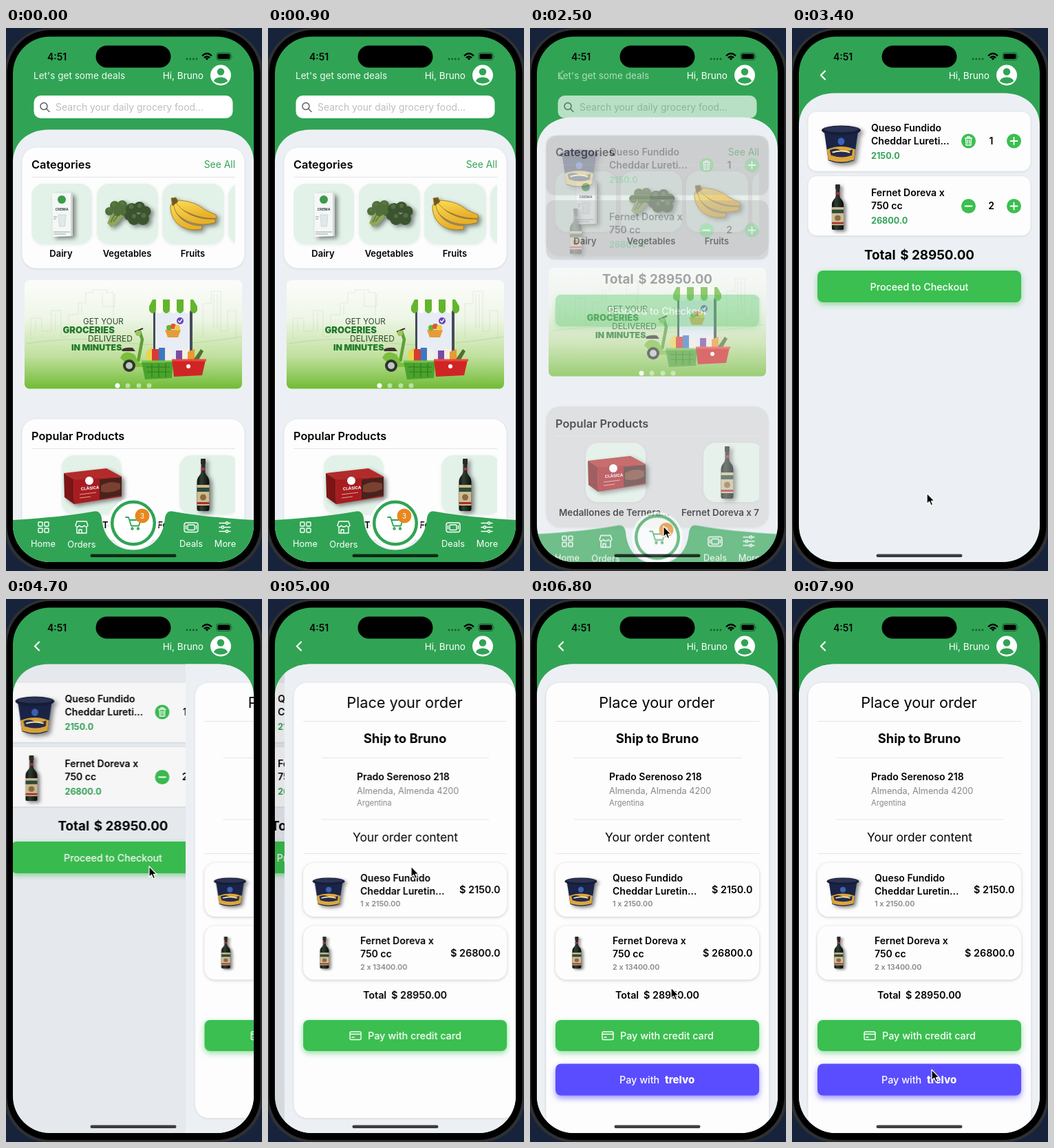
An HTML page that plays this animation: 372x788 px, repeating every 8000 ms.

```html
<!DOCTYPE html>
<html lang="en">
<head>
<meta charset="utf-8">
<title>Grocery checkout</title>
<style>
html, body { margin: 0; width: 100%; height: 100%; overflow: hidden; background: #16233a; }
svg { display: block; width: 372px; height: 788px; font-family: Inter, Roboto, sans-serif; font-size: 14px; }
.mid { text-anchor: middle; }
.end { text-anchor: end; }
.b { font-weight: 600; }
.bb { font-weight: 700; }
.white { fill: #fff; }
.grey { fill: #85878a; }
.green { fill: #34a457; }
.line { stroke: #e3e5e7; }
.tile { fill: #e3f2e9; filter: drop-shadow(0 1px 2px #0001); }
.card { fill: #fdfdfe; stroke: #dfe2e5; stroke-width: .8; filter: drop-shadow(0 1px 1px #0001); }
.item { fill: #fdfdfe; filter: drop-shadow(0 1px 2px #0003); }
.btn { fill: #3bbf50; filter: drop-shadow(0 3px 4px #3bbf5088); }
.pay { fill: #5a4dff; filter: drop-shadow(0 4px 4px #5a4dff99); }
.cast { filter: drop-shadow(4px 3px 3px #0007); }
.icon { fill: none; stroke: #fff; stroke-width: 1.4; stroke-linecap: round; stroke-linejoin: round; }
.name { font-weight: 600; font-size: 14px; }

.lift, .sink, .out, .in, .shadeOut, .shadeIn, .back, .push, .dim, .late, .cursor {
  animation: 8s linear infinite;
}
.lift { animation-name: lift; }
.sink { animation-name: sink; }
.out { animation-name: out; }
.in { animation-name: in; }
.shadeOut { animation-name: shadeOut; }
.shadeIn { animation-name: shadeIn; }
.back { animation-name: back; }
.push { animation-name: push; }
.dim { animation-name: dim; }
.late { animation-name: late; }
.cursor { animation-name: cursor; }

@keyframes lift {
  0%, 29.45% { transform: translateY(0); animation-timing-function: cubic-bezier(.4,0,.2,1); }
  35.7%, 100% { transform: translateY(-53px); }
}
@keyframes sink {
  0%, 29.45% { transform: translateY(0); opacity: 1; animation-timing-function: cubic-bezier(.4,0,.2,1); }
  35.7%, 100% { transform: translateY(60px); opacity: 0; }
}
@keyframes out {
  0%, 29.45% { opacity: 1; animation-timing-function: cubic-bezier(.4,0,.2,1); }
  35.7%, 100% { opacity: 0; }
}
@keyframes in {
  0%, 29.45% { opacity: 0; animation-timing-function: cubic-bezier(.4,0,.2,1); }
  35.7%, 100% { opacity: 1; }
}
@keyframes shadeOut {
  0%, 29.45% { fill: #fdfdfe; }
  31.25%, 100% { fill: #d8d8d8; }
}
@keyframes shadeIn {
  0%, 31.25% { fill: #a8a8a8; }
  35.7%, 100% { fill: #fdfdfe; }
}
@keyframes back {
  0%, 58% { transform: translateX(0); animation-timing-function: cubic-bezier(.15,.25,.25,1); }
  64.25%, 100% { transform: translateX(-105px); }
}
@keyframes push {
  0%, 58% { transform: translateX(350px); animation-timing-function: cubic-bezier(.15,.25,.25,1); }
  64.25%, 100% { transform: translateX(0); }
}
@keyframes dim {
  0%, 58% { opacity: 0; animation-timing-function: cubic-bezier(.15,.25,.25,1); }
  64.25%, 100% { opacity: .1; }
}
@keyframes late {
  0%, 79.99% { visibility: hidden; }
  80%, 100% { visibility: visible; }
}
@keyframes cursor {
  0%, 11.25% { transform: translate(232px, 800px); animation-timing-function: ease-in-out; }
  18.75%, 39.4% { transform: translate(194px, 723px); animation-timing-function: ease-in-out; }
  51.25%, 77.5% { transform: translate(208px, 388px); animation-timing-function: ease-in-out; }
  91%, 100% { transform: translate(203px, 683px); }
}
</style>
</head>
<body>
<svg viewBox="0 0 372 788">
<defs>
  <clipPath id="screen"><rect x="10" y="12.5" width="350" height="762.5" rx="54"/></clipPath>
  <clipPath id="sheet"><path id="sheetShape" d="M10 195C10 167 31 147.500 62 147.500H308C339 147.500 360 167 360 195V900H10Z"/></clipPath>
  <clipPath id="list"><rect x="37" y="218" width="296" height="540"/></clipPath>
  <clipPath id="ad"><rect x="27" y="366" width="316" height="157.5" rx="7"/></clipPath>
  <linearGradient id="meadow" x2="0" y2="1">
    <stop offset="0" stop-color="#fcfdfb"/><stop offset=".35" stop-color="#eef6e7"/>
    <stop offset=".7" stop-color="#c0e09d"/><stop offset="1" stop-color="#70bb34"/>
  </linearGradient>
  <linearGradient id="glass">
    <stop offset="0" stop-color="#0c0f0c"/><stop offset=".35" stop-color="#303e32"/><stop offset="1" stop-color="#0a0c0a"/>
  </linearGradient>
  <linearGradient id="peel" x2=".3" y2="1">
    <stop offset="0" stop-color="#fbdc58"/><stop offset="1" stop-color="#e8b02a"/>
  </linearGradient>
  <pattern id="stripes" width="20" height="60" x="208" patternUnits="userSpaceOnUse">
    <rect width="10" height="60" fill="#64b52e"/><rect x="10" width="10" height="60" fill="#fffdf2"/>
  </pattern>

  <!-- 22 x 76 -->
  <g id="bottle" class="cast">
    <path d="M8 1H14V18C14 25 20 25 20 34V73Q20 76 17 76H5Q2 76 2 73V34C2 25 8 25 8 18Z" fill="url(#glass)"/>
    <rect x="7.500" width="7" height="8" rx="1" fill="#2b2a25"/>
    <path d="M8 13h6v4h-6z" fill="#a5343a"/>
    <path d="M2 38H20V68H2Z" fill="#cdbc90"/>
    <path d="M2 42H20V48H2Z" fill="#2d4a3c"/>
    <circle cx="11" cy="56" r="4.500" fill="#8c6a44"/>
    <path d="M2 63H20V66H2Z" fill="#a8312f"/>
  </g>

  <!-- 58 x 52 -->
  <g id="tub" class="cast">
    <path d="M4 9H54L48 48Q29 55 10 48Z" fill="#1a2447"/>
    <path d="M8 33Q29 25 50 33L48 47Q29 53 10 47Z" fill="#dda63a"/>
    <path d="M12 34q8-4 16 0t18-1l-1 8q-15 5-31 0z" fill="#262c4c"/>
    <path d="M16 37q13-4 26 0" stroke="#f7e6b0" stroke-width="2" fill="none"/>
    <ellipse cx="29" cy="7" rx="29" ry="6.500" fill="#171d36"/>
    <ellipse cx="29" cy="5.500" rx="26" ry="4" fill="#2a3354"/>
    <circle cx="29" cy="22" r="5" fill="#3d62b5"/>
  </g>

  <g id="trash" fill="none" stroke="#fff" stroke-width="1.300" stroke-linecap="round">
    <path d="M-5-4H5M-2-4V-6H2V-4M-4-4L-3.400 6H3.400L4-4M-1.400-1.500V3.500M1.400-1.500V3.500"/>
  </g>
  <g id="plus"><circle r="10.500" fill="#3bbf50"/><path d="M-5 0H5M0-5V5" stroke="#fff" stroke-width="1.800" stroke-linecap="round"/></g>
</defs>

<!-- phone body -->
<rect width="372" height="788" fill="#16233a"/>
<rect x="-3" y="0" width="377" height="789" rx="67" fill="#2f3033"/>
<rect x="1.500" y="3" width="368" height="782" rx="63" fill="#000"/>

<g clip-path="url(#screen)">
  <rect x="10" y="12" width="350" height="764" fill="#30a454"/>

  <g class="out">
    <text x="40" y="74" font-size="13.600" class="white" opacity=".93">Let's get some deals</text>
    <rect x="40.500" y="98" width="289" height="33" rx="10" fill="#fff"/>
    <g fill="none" stroke="#55585c" stroke-width="1.400" stroke-linecap="round"><circle cx="55" cy="113.500" r="5"/><path d="M59 117.500L63 121.500"/></g>
    <text x="72" y="120" font-size="13.900" fill="#bbbec2">Search your daily grocery food...</text>
  </g>
  <path class="in" d="M48 62.500L42 68.500L48 74.500" fill="none" stroke="#fff" stroke-width="2.200" stroke-linecap="round" stroke-linejoin="round"/>
  <text x="287" y="74" font-size="13.600" class="white end">Hi, Bruno</text>
  <circle cx="312" cy="68.500" r="15" fill="#fff"/>
  <circle cx="312" cy="63.500" r="5.200" fill="#30a454"/>
  <path d="M302 77.500C303 69.500 321 69.500 322 77.500Q312 84 302 77.500Z" fill="#30a454"/>

  <g class="lift">
    <use href="#sheetShape" fill="#ecf0f4"/>
    <g clip-path="url(#sheet)">

      <!-- home -->
      <g class="out">
        <rect class="card shadeOut" x="23" y="173" width="324" height="176" rx="21"/>
        <text x="37" y="204" font-size="16.350" class="b">Categories</text>
        <text x="333" y="203" font-size="13.900" class="green end">See All</text>
        <path class="line" d="M37 216.500H333"/>
        <g clip-path="url(#list)">
          <rect class="tile" x="37" y="226" width="88" height="88" rx="18"/>
          <rect class="tile" x="132" y="226" width="89" height="88" rx="18"/>
          <rect class="tile" x="227" y="226" width="90" height="88" rx="18"/>
          <rect class="tile" x="323" y="226" width="90" height="88" rx="18"/>
        </g>
        <g class="cast">
          <path d="M67 240L94 239L97 243V302L68 303Z" fill="#f5f7f6"/>
          <path d="M94 239L97 243V302L94 302Z" fill="#cfd6d3"/>
          <circle cx="81" cy="249" r="6" fill="#3c9a4c"/>
          <text x="81" y="265" font-size="5.200" class="mid bb" fill="#35434a">CREMA</text>
          <path d="M76 271h11l-1.500 17h-8z" fill="#e0e9e9" stroke="#b9c9c8" stroke-width=".6"/>
          <path d="M69 274h5M69 277h4M69 296h24M69 299h18" stroke="#8fa3a0" stroke-width="1.200"/>
        </g>
        <g class="cast">
          <path d="M152 272L147 283L153 289L162 283L172 271L162 264Z" fill="#8fa85a"/>
          <path d="M156 281L166 268M152 282L160 267" stroke="#657f44" stroke-width="2"/>
          <g fill="#4f6e3a">
            <circle cx="150" cy="266" r="6"/><circle cx="158" cy="258" r="7"/><circle cx="169" cy="257" r="7"/><circle cx="172" cy="267" r="6"/><circle cx="162" cy="267" r="6"/>
          </g>
          <g fill="#3c5330">
            <circle cx="183" cy="263" r="9"/><circle cx="194" cy="260" r="8"/><circle cx="203" cy="266" r="7.500"/><circle cx="199" cy="277" r="9"/><circle cx="186" cy="277" r="9"/><circle cx="178" cy="273" r="6"/>
          </g>
          <g fill="#5d7a48" opacity=".7">
            <circle cx="156" cy="256" r="3"/><circle cx="169" cy="254" r="3"/><circle cx="182" cy="259" r="3.500"/><circle cx="194" cy="258" r="3"/><circle cx="200" cy="272" r="3.500"/><circle cx="186" cy="273" r="3"/><circle cx="150" cy="264" r="2.500"/>
          </g>
        </g>
        <g class="cast" fill="url(#peel)" stroke="#96701a" stroke-width=".8">
          <path d="M247 250C266 250 280 256 289 264L305 271L306 276C284 278 260 268 245 256Z"/>
          <path d="M245 251C255 266 275 279 303 277L305 282C281 290 252 282 241 258Z"/>
          <path d="M243 252C244 272 260 287 285 287L284 292C256 297 238 280 239 258Z"/>
          <path d="M240 247L247 246L250 252L242 258Z" fill="#6e5a20"/>
        </g>
        <g class="mid b" font-size="13">
          <text x="80" y="332">Dairy</text><text x="176" y="332">Vegetables</text><text x="271.500" y="332">Fruits</text>
        </g>

        <!-- banner -->
        <g clip-path="url(#ad)">
          <rect x="27" y="366" width="316" height="158" fill="url(#meadow)"/>
          <path d="M36 452V421H52V440H66V410H80V448H91V416H105V399H116V384H126V380H146V384H156V418M140 384V404H158V386M286 450V400H298V382H312V440H322V410H334V452M302 386V436M307 386V436M110 402V416M43 425V440M72 414V440" fill="none" stroke="#9eb395" stroke-width=".6" opacity=".35"/>
          <path d="M30 458Q110 446 170 456T342 448" fill="none" stroke="#88ad74" stroke-width=".6" opacity=".5"/>
          <g fill="#2c4a2c">
            <text x="112" y="430" font-size="11.600">GET YOUR</text>
            <text x="119" y="455" font-size="12">DELIVERED</text>
          </g>
          <g fill="#217a2b" font-weight="900">
            <text x="82.500" y="443" font-size="13">GROCERIES</text>
            <text x="95" y="468" font-size="12.300">IN MINUTES</text>
          </g>
          <rect x="214" y="394" width="57" height="92" rx="5" fill="#454c58"/>
          <rect x="217" y="397" width="50" height="85" rx="2" fill="#e7ecf5"/>
          <path d="M213 394H272L278 404V410Q273 418 268 410Q263 418 258 410Q253 418 248 410Q243 418 238 410Q233 418 228 410Q223 418 218 410Q213 418 208 410V404Z" fill="url(#stripes)"/>
          <circle cx="253" cy="425" r="5" fill="#6644b8"/><path d="M250.500 425l2 2 3-4" class="icon"/>
          <path d="M231 438H254L250 449H235Z" fill="#e59b3a"/>
          <circle cx="237" cy="435" r="4" fill="#64b52e"/><circle cx="243" cy="433" r="4" fill="#e0572f"/><circle cx="249" cy="435" r="4" fill="#f2c83c"/>
          <g>
            <path d="M194 440L198 452L192 484" fill="none" stroke="#5f9f35" stroke-width="4.500"/>
            <path d="M166 479Q171 465 187 474L193 486H206V492H181Z" fill="#7cbf3e"/>
            <path d="M168 467Q172 463 184 464L188 469H169Z" fill="#3c3430"/>
            <circle cx="179" cy="490" r="9" fill="#2f332f"/><circle cx="179" cy="490" r="5" fill="#bfc6c0"/>
            <path d="M187 441L199 436" stroke="#3c3430" stroke-width="2"/><circle cx="192" cy="443" r="4" fill="#9ac75c"/>
          </g>
          <g>
            <path d="M203 470l9-7 7 22h-14z" fill="#e9d54c"/><path d="M212 466h10v20h-10z" fill="#d83a34"/><path d="M222 464h9v22h-9z" fill="#3c79c2"/><path d="M231 468l9-3 3 20h-12z" fill="#f1efe6"/>
            <path d="M247 468h9v18h-9z" fill="#7c4aa0"/><path d="M256 464h9v22h-9z" fill="#f3efe4"/><path d="M264 470l10-4v20h-10z" fill="#e89a2e"/><path d="M272 482l11-16 4 3-9 16z" fill="#51702f"/>
            <path d="M197 484L243 486L241 508L202 510Z" fill="#4aa32c"/><path d="M197 484H243" stroke="#76c648" stroke-width="3"/>
            <path d="M204 492H238M205 499H238M212 487V507M222 487V507M232 487V507" stroke="#2f7d1b" stroke-width="1.200"/>
            <path d="M241 481L290 482L285 504L244 506Z" fill="#cf2625"/><path d="M241 482H291" stroke="#ea4a42" stroke-width="3"/>
            <circle cx="265" cy="491" r="3" fill="#fff"/>
          </g>
          <circle cx="162" cy="519" r="3.500" fill="#fff"/>
          <g fill="#fff" opacity=".5"><circle cx="177" cy="519" r="3.500"/><circle cx="193" cy="519" r="3.500"/><circle cx="208" cy="519" r="3.500"/></g>
        </g>

        <!-- popular -->
        <rect class="card shadeOut" x="23" y="567" width="324" height="176" rx="21"/>
        <text x="37" y="598" font-size="16.300" class="b">Popular Products</text>
        <path class="line" d="M37 610.500H333"/>
        <g clip-path="url(#list)">
          <rect class="tile" x="81" y="620" width="87" height="86" rx="18"/>
          <rect class="tile" x="252" y="620" width="87" height="86" rx="18"/>
          <text x="42" y="725.500" font-size="13.400" class="b">Medallones de Ternera...</text>
          <text x="220" y="725.500" font-size="13.400" class="b">Fernet Doreva x 750 cc</text>
        </g>
        <g class="cast">
          <path d="M84 646L146 639L168 651L98 655Z" fill="#b32a2a"/>
          <path d="M84 646L98 655L99 691L85 681Z" fill="#7c1416"/>
          <path d="M98 655L168 651V680L99 691Z" fill="#a81c20"/>
          <path d="M136 655L168 652V678L136 684Z" fill="#4a211c"/>
          <path d="M138 664q13-8 28-3v8q-13 7-28 4z" fill="#7a4030"/>
          <circle cx="121" cy="657" r="6" fill="#fff"/>
          <text x="109" y="671" font-size="6" class="white bb" transform="rotate(-5 109 671)">CLÁSICA</text>
          <path d="M107 677l24-3M107 682l16-2" stroke="#d8a890" stroke-width="1"/>
        </g>
        <use href="#bottle" transform="translate(275.500 625)"/>
      </g>

      <!-- cart -->
      <g class="in"><g class="back"><g transform="translate(0 53)">
        <rect class="card shadeIn" x="23" y="121" width="324" height="87" rx="13"/>
        <rect class="card shadeIn" x="23" y="214.500" width="324" height="87" rx="13"/>
        <use href="#tub" transform="translate(43 141) scale(.98 1.070)"/>
        <use href="#bottle" transform="translate(56 227) scale(.95 .87)"/>
        <g class="name">
          <text x="115" y="150">Queso Fundido</text><text x="115" y="169">Cheddar Lureti...</text>
          <text x="115" y="244">Fernet Doreva x</text><text x="115" y="263">750 cc</text>
          <text x="289.500" y="169" class="mid">1</text><text x="289.500" y="263" class="mid">2</text>
        </g>
        <g class="green bb" font-size="12.600"><text x="115" y="190">2150.0</text><text x="115" y="284">26800.0</text></g>
        <circle cx="256.500" cy="164" r="10.500" fill="#3bbf50"/><use href="#trash" x="256.500" y="164"/>
        <circle cx="256.500" cy="258.500" r="10.500" fill="#3bbf50"/><path d="M251.500 258.500h10" stroke="#fff" stroke-width="1.800" stroke-linecap="round"/>
        <use href="#plus" x="322.500" y="164"/><use href="#plus" x="322.500" y="258.500"/>
        <g class="bb" font-size="18.800"><text x="105" y="336">Total</text><text x="265" y="336" class="end">$ 28950.00</text></g>
        <rect class="btn" x="37" y="352" width="296" height="46" rx="8"/>
        <text x="185" y="380.500" font-size="14.250" class="white mid" font-weight="500">Proceed to Checkout</text>
        <rect class="dim" x="10" y="90" width="350" height="700"/>
      </g></g></g>

      <!-- order -->
      <g class="push"><g transform="translate(0 53)">
        <rect x="10" y="90" width="352" height="700" fill="#ecf0f4"/>
        <rect class="card" x="23" y="121" width="324.500" height="632.500" rx="20"/>
        <rect class="card late" x="23" y="121" width="324.500" height="700" rx="20"/>
        <g class="mid">
          <text x="184.500" y="157.500" font-size="21.600">Place your order</text>
          <text x="185" y="208.500" font-size="18.400" class="bb">Ship to Bruno</text>
          <text x="185.500" y="351.500" font-size="17.300">Your order content</text>
        </g>
        <path class="line" d="M37 177.500H333M64 230.500H307M64 320H307M37 369.500H333"/>
        <text x="115" y="262.500" class="name">Prado Serenoso 218</text>
        <text x="115" y="282.500" font-size="12.700" class="grey">Almenda, Almenda 4200</text>
        <text x="115" y="299.500" font-size="11.100" class="grey">Argentina</text>
        <rect class="item" x="37" y="383" width="296" height="78" rx="16"/>
        <rect class="item" x="37" y="474.500" width="296" height="78" rx="16"/>
        <use href="#tub" transform="translate(50.500 404) scale(.81)"/>
        <use href="#bottle" transform="translate(60 490) scale(.72 .61)"/>
        <g class="name">
          <text x="120" y="409.500">Queso Fundido</text><text x="120" y="428.500">Cheddar Luretin...</text>
          <text x="120" y="501">Fernet Doreva x</text><text x="120" y="520">750 cc</text>
        </g>
        <g class="b end" font-size="14.350"><text x="323.500" y="427">$ 2150.0</text><text x="323.500" y="518.500">$ 26800.0</text></g>
        <g class="grey b" font-size="10.800"><text x="120" y="446">1 x 2150.00</text><text x="120" y="537.500">2 x 13400.00</text></g>
        <g class="b" font-size="14.300"><text x="124" y="580">Total</text><text x="246" y="580" class="end">$ 28950.00</text></g>
        <rect class="btn" x="37" y="611" width="296" height="45" rx="8"/>
        <g class="icon"><rect x="105" y="628" width="16" height="11.500" rx="1.800"/><path d="M105 631.500H121M108 636h3"/></g>
        <text x="131" y="638.500" font-size="14.350" class="white" font-weight="500">Pay with credit card</text>
        <g class="late">
          <rect class="pay" x="37" y="674.500" width="296" height="46" rx="8"/>
          <text x="130" y="702.500" font-size="14.350" class="white" font-weight="500">Pay with</text>
          <text x="196" y="702.500" class="white" font-size="15" font-weight="800">trelvo</text>
        </g>
      </g></g>
    </g>
  </g>

  <!-- tab bar -->
  <g class="sink">
    <path d="M10 714Q80 710 128 701.500Q137 700 139 711C141 740 160 757.500 185 757.500C210 757.500 229 740 231 711Q233 700 242 701.500Q290 710 360 714V850H10Z" fill="#30a454"/>
    <circle cx="185" cy="719" r="37" fill="#fff"/>
    <circle cx="185" cy="718.500" r="30.800" fill="#fff" stroke="#30a454" stroke-width="4.500"/>
    <g fill="none" stroke="#30a454" stroke-width="1.800" stroke-linecap="round" stroke-linejoin="round">
      <path d="M174 710H178L182 722.500H193L195.500 714H179.500"/><circle cx="183.500" cy="726.500" r="1.300"/><circle cx="192" cy="726.500" r="1.300"/>
    </g>
    <circle cx="198" cy="708" r="10.500" fill="#e8871f"/>
    <text x="198" y="711.800" font-size="10.500" class="white mid">3</text>
    <g class="icon">
      <rect x="47" y="717" width="6" height="6" rx="1"/><rect x="56" y="717" width="6" height="6" rx="1"/><rect x="47" y="726" width="6" height="6" rx="1"/><rect x="56" y="726" width="6" height="6" rx="1"/>
      <path d="M103 716H117L119 722Q116.500 726 114 722Q110 726 106.500 722Q103.500 726 101 722ZM103 725V733H117V725M106 733V728H110V733"/>
      <rect x="259" y="718" width="20" height="13.500" rx="3"/><rect x="264" y="721" width="10" height="7.500" rx="1"/><path d="M261.500 722v5M276.500 722v5"/>
      <path d="M310 718.500H326M310 724.500H326M310 730.500H326"/>
      <g fill="#30a454"><circle cx="321" cy="718.500" r="1.700"/><circle cx="315" cy="724.500" r="1.700"/><circle cx="321" cy="730.500" r="1.700"/></g>
    </g>
    <g class="white mid" font-size="12.800">
      <text x="54" y="753">Home</text><text x="110" y="754">Orders</text><text x="269" y="753">Deals</text><text x="318.500" y="753">More</text>
    </g>
  </g>

  <rect x="122.500" y="763.500" width="125" height="4.500" rx="2.200" opacity=".75"/>
</g>

<!-- status bar -->
<text x="60" y="46.500" font-size="14" class="b">4:51</text>
<rect x="130.500" y="25.500" width="109" height="32" rx="16"/>
<g opacity=".45"><circle cx="263" cy="45" r="1.400"/><circle cx="267.700" cy="45" r="1.400"/><circle cx="272.300" cy="45" r="1.400"/><circle cx="277" cy="45" r="1.400"/></g>
<g fill="none" stroke="#000" stroke-width="2.200"><path d="M285 40.500Q292 33.500 299 40.500M287.800 43.300Q292 39.300 296.200 43.300"/></g>
<path d="M289.600 44.300Q292 42.300 294.400 44.300L292 46.800Z"/>
<rect x="306" y="36" width="21" height="10.500" rx="3" fill="none" stroke="#000" opacity=".45"/>
<rect x="307.500" y="37.500" width="18" height="7.500" rx="1.800"/>
<path d="M328.500 39.500Q330 41.200 328.500 43Z" opacity=".5"/>

<g class="cursor">
  <path d="M0 0V15.500L3.600 12.200L6 17.700L8.600 16.500L6.300 11.300H11Z" stroke="#fff" stroke-width="1.200" stroke-linejoin="round"/>
</g>
</svg>
</body>
</html>
```
